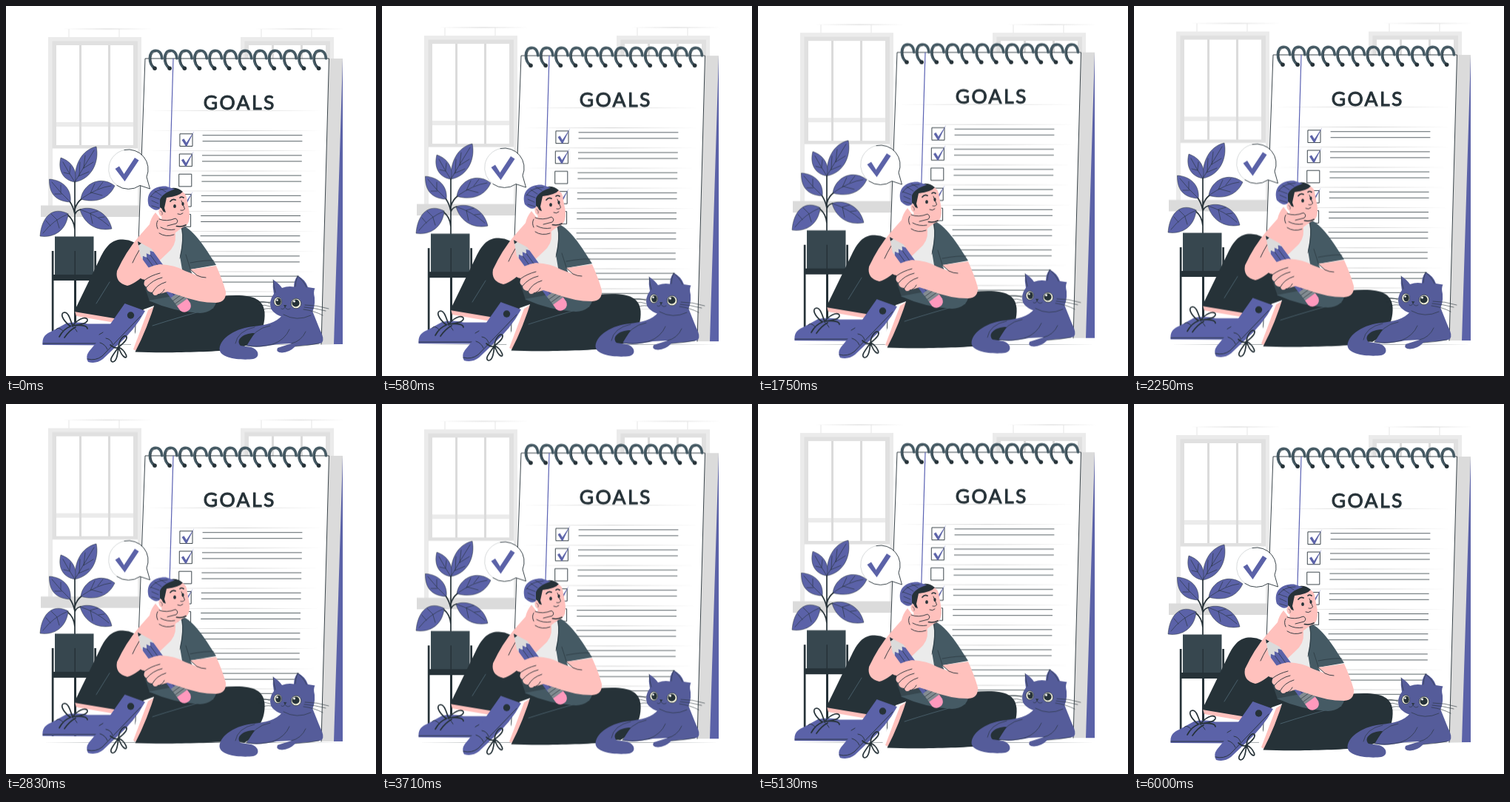
An HTML page for the animation above (6040 ms loop, 500 px wide and 500 px high).

```html
<!DOCTYPE html>
<html lang="en">
<head>
<meta charset="utf-8">
<title>Goals</title>
<style>
  html, body { margin: 0; width: 100%; height: 100%; overflow: hidden; background: #fff; }
  svg { display: block; width: 100%; height: 100%; }

  /* Six seconds of motion, then one short rest before the loop repeats. */
  .slow { animation: slow 6.04s linear infinite; }
  .fast { animation: fast 6.04s linear infinite; }
  @keyframes slow {
    0%, 99.34%, 100% { transform: translateY(0); }
    49.67% { transform: translateY(-10px); }
  }
  @keyframes fast {
    0%, 49.67%, 99.34%, 100% { transform: translateY(0); }
    24.83%, 74.5% { transform: translateY(-10px); }
  }

  .purple { fill: #5b62a8; }
  .cat { fill: #555c9a; }
  .dark { fill: #263238; }
  .slate { fill: #37474f; }
  .jacket { fill: #455a64; }
  .skin { fill: #ffc1bd; }
  .pale { fill: #ebebeb; }
  .grey { fill: #dbdbdb; }
  .white { fill: #fff; }
  .rule { fill: #d4d4d4; }
  .ink { fill: none; stroke: #263238; stroke-width: .9; stroke-linecap: round; stroke-linejoin: round; }
  .thin { stroke-width: .6; }
  .bold { stroke-width: 1.7; }
  .title {
    font: 400 26.5px Lato, "Open Sans", sans-serif; letter-spacing: 2.4px;
    fill: #263238; stroke: #263238; stroke-width: 1; stroke-linejoin: round;
  }
</style>
</head>
<body>
<svg viewBox="0 0 500 500" xmlns="http://www.w3.org/2000/svg">
  <defs>
    <g id="window">
      <path class="rule" d="M18 31L80 30.500L142 31L80 31.500ZM27.700 31H28.300V42H27.700ZM95.700 31H96.300V42H95.700Z"/>
      <path class="pale" d="M0 42H126V272H0Z"/>
      <path class="white" d="M6 192H121V272H6Z"/>
      <path fill="#e0e0e0" d="M5.500 47.500H121V192.500H5.500Z"/>
      <path class="white" d="M11 53H115V188H11Z"/>
      <path class="pale" d="M11 157H115V163H11Z"/>
      <path class="grey" d="M42 53H45V188H42ZM81 53H84V188H81Z"/>
    </g>
    <path id="tick" class="purple" d="M237.500 181L240.500 179.300L243.800 184.800L254.300 169L244.300 189.500L243 189.500Z"/>
    <g id="coil" fill="none" stroke-linecap="round">
      <path stroke="#455a64" stroke-width="3.600" d="M0 0C-9 -6 -9 -24 1 -24C7 -24 9.300 -19 9.800 -13.500"/>
      <path stroke="#263238" stroke-width=".7" d="M-1.500 -2.500C-7.500 -9 -6 -22.300 1.500 -22.500"/>
      <circle class="dark" r="2.800"/>
    </g>
  </defs>

  <path class="dark" opacity=".7" d="M50 457.200L250 456.700L455 457.200L250 457.700Z"/>

  <g class="slow">
    <use href="#window" x="57"/>
    <use href="#window" x="317"/>
    <path class="grey" d="M47 269.500H190V285H47Z"/>
  </g>

  <g class="fast">
    <path class="purple" d="M454 71H455V457H441Z"/>
    <path class="grey" d="M436 71H455L443 457H425Z"/>
    <path class="white" d="M188 71H436.500L426 457H174Z"/>
    <g id="rules"></g>
    <path class="ink" d="M174 457L188 71H436.500L426 457"/>
    <path fill="none" stroke="#5b62b4" stroke-width="1.200" d="M226 71L220.500 260"/>
    <text class="title" x="266.700" y="140.300">GOALS</text>
    <g id="rows"></g>
    <g id="coils"></g>
  </g>

  <g class="slow">
    <path class="white" d="M190 231L194.500 247L181 242.500A26.700 26.700 0 1 1 190 231Z"/>
    <path class="ink" d="M150 242.500A26.700 26.700 0 0 0 181 242.500L194.500 247L190 231A26.700 26.700 0 0 0 160 194.500"/>
    <path class="ink thin" opacity=".3" d="M150 242.500A26.700 26.700 0 0 1 160 194.500"/>
    <path class="purple" d="M147.500 220L153 216.500L159.500 227L174 205L179.500 208.500L160.500 237Z"/>
  </g>

  <g class="fast">
    <path class="ink bold" d="M93 312V237M93 281Q91 271 86 264M93 275Q95 266 103 260M93 282Q95 276 101 275M93 302Q92 289 83 282"/>
    <g class="purple" stroke="#263238" stroke-width=".5">
      <path d="M93 238C92 216 101 195 122 190C126 208 118 233 93 238Z"/>
      <path d="M93 238C76 235 70 221 74 205C89 210 97 223 93 238Z"/>
      <path d="M87 265C66 264 58 252 58.500 234C76 235 89 247 87 265Z"/>
      <path d="M101 261C104 240 128 228 147 243C138 263 118 266 101 261Z"/>
      <path d="M100 275C112 270 137 275 143 301C124 305 106 296 100 275Z"/>
      <path d="M84 281C64 270 48 284 46 311C66 314 82 302 84 281Z"/>
    </g>
    <path class="ink thin" d="M93 238Q106 216 119 195M99 229L100 211M98 230L112 224M105 219L107 202M105 219L118 211M93 238Q84 224 77 211M86 227L78 225M86 226L87 216M87 265Q73 252 62 238M75 254L66 254M74 252L74 242M101 261Q124 245 142 243M114 253L120 240M115 252L130 256M124 247L131 238M100 275Q122 282 139 297M114 280L124 277M114 280L117 294M125 286L133 285M84 281Q64 289 50 307M69 289L61 281M69 290L72 300M60 297L54 290"/>
    <path class="slate" d="M66 311.500H118.500V364H66Z"/>
    <path class="dark" d="M61.800 331H64.500V450H61.800ZM119.300 331H122V450H119.300ZM61.800 363H122V371H61.800ZM92 371H95V450H92ZM92.500 331H94V364H92.500Z"/>
  </g>

  <g class="slow">
    <!-- far leg and shoe -->
    <path class="white" d="M96 414L155 422L146 436L96 434Z"/>
    <path class="skin" d="M93 412L157 421L153 429L95 419Z"/>
    <path class="purple" d="M49.500 458C48.500 447 54 443 61 440L81 429Q96 426 110 429.500L150 429.500L136 458.500Z"/>
    <path class="ink" d="M50 456H136M126 444L131 441M78 440Q70 432 68 437M96 440Q92 432 84 431"/>
    <path class="dark" d="M92 413L127 341C136 322 145 315 158 315.500Q174 316 186 330L212 400L158 424Z"/>
    <path class="ink bold" d="M72 447Q78 436 87 433M79 448Q86 438 94 434M87 433C75 423 73 415 79 414C85 414 87 425 90 432C101 419 111 420 110 425C109 429 99 431 90 432M90 432C104 430 110 433 110 436"/>

    <!-- near leg and shoe -->
    <path class="white" d="M186 410L200 405L176 467L168 460Z"/>
    <path class="skin" d="M192 411L206 402L178 467L172 464Z"/>
    <path class="dark" d="M203 396Q191 436 174.500 467.500C210 469 270 468 302 465C336 461 351 440 349.500 414C348 397 335 391 311 391C283 391 260 397 240 402L195 385L190 400Z"/>
    <path class="purple" d="M160.500 402L188 412Q174 438 150 459L131 477Q122 484 111 481Q107 474 112 467L131 444Z"/>
    <circle class="dark" cx="168.500" cy="418" r="4.700"/>
    <path class="ink" d="M110 477Q121 480 130 473L182 419M135 449Q142 450 144 457M127 455Q134 457 137 464"/>
    <path class="ink bold" d="M141 458Q148 464 152 461C145 471 138 479 144 481C150 481 151 469 152 461C158 478 165 477 162 471Q159 464 152 461C153 449 161 443 163 447C164 452 157 457 152 461"/>
    <path class="ink thin" style="stroke:#607d8b" d="M198 432Q235 420 280 408M122 402L140 373"/>

    <!-- torso -->
    <path class="slate" d="M192 352L186 375L194 399L260 410L245 340Z"/>
    <path class="jacket" d="M237 296C254 302 268 325 284 350L249 356L262 385L285 397Q282 414 262 415Q226 413 193 398L236 390L230 338Z"/>
    <path class="pale" d="M207 320L237 301Q240 315 235 338L238 356L196 363L190 344Z"/>
    <path class="ink thin" d="M238 300Q241 320 235 341M249 347Q270 343 281 344M249 355L243 336"/>

    <!-- head -->
    <path class="skin" d="M211 258L236 250Q244 252 245 264L247.500 277Q250 296 239 299L228 307L210 298Z"/>
    <path class="dark" d="M209 252Q227 240 239 251Q234 257 217 259L214 273L216 279Q209 278 207 268Z"/>
    <path class="purple" d="M193 270C188 253 199 243 216 243.500L228 247.500Q211 253 208 262L208 274Q202 279 193 270Z"/>
    <path class="ink thin" d="M195 258Q202 247 218 247M197 263L206 267M196 257L207 261M201 250L210 256M207 246L216 251M197 270L207 273"/>
    <path class="skin" d="M210 273Q205 273 207 281Q210 287 215 283Z"/>
    <path class="ink thin" d="M209 277Q212 278 211 282"/>
    <ellipse class="dark" cx="228" cy="270.500" rx="1.900" ry="2.600"/>
    <ellipse class="dark" cx="239" cy="267.500" rx="1.600" ry="2.400"/>
    <path class="ink bold" d="M222 264Q225 260 229 262M235 259Q237 257 240 259"/>
    <path class="ink" d="M237 263L241.500 274Q240 277 236 276M232 281Q236 283 239 280"/>
    <path class="ink bold" d="M226 296Q235 300 243 296"/>

    <!-- raised arm -->
    <path class="skin" d="M202 279Q196 286 194 295L179 312Q162 332 150 358Q147 374 164 378Q177 375 199 352L218 334Q230 324 229 310L228 299Q234 294 232 289Q228 285 219 289L209 288Z"/>
    <path class="ink" d="M207 288Q217 292 229 287Q234 290 230 294L218 297M209 299Q218 304 228 302M207 307Q216 313 227 309M205 290Q202 295 205 301M180 330Q174 340 171 347"/>

    <!-- pencil -->
    <g transform="translate(178 318) rotate(54)">
      <path class="grey" d="M0 0L19 -9H26V9H19Z"/>
      <path class="dark" d="M0 0L5 -2.400V2.400Z"/>
      <path class="purple" d="M24 -9L20 -6L25 -3L20 0L25 3L20 6L24 9H91V-9Z"/>
      <path class="ink thin" d="M25 -3H91M25 3H91"/>
      <path fill="#828b91" d="M88 -8.500H102V8.500H88Z"/>
      <path fill="#ff99bd" d="M102 -8.500H109Q116 -7 116 0Q116 7 109 8.500H102Z"/>
      <path class="ink thin" d="M93 -8.500V8.500M98 -8.500V8.500"/>
    </g>

    <!-- lower arm and hand -->
    <path class="skin" d="M249 356L284 351Q293 371 297 386Q298 400 284 401Q260 401 234 391L218 386L205 390Q199 393 198 387Q190 387 190 380Q184 377 188 370Q179 369 181 363Q191 351 208 349Q229 350 242 358L258 364Z"/>
    <path class="ink" d="M188 370Q196 364 208 361M190 380Q198 370 211 367M198 387Q203 377 216 373M205 390Q211 389 214 383M249 356L258 364Q264 367 270 367"/>
  </g>

  <g class="fast">
    <path class="dark" d="M307 456Q309 437 337 434L342 446L322 459Z"/>
    <path class="cat" d="M374 417C365 429 350 431 335 433C311 435 290 448 288.500 463C288 477 320 479 334 477C344 475 342 464 331 461L317 459C310 452 319 442 336 442L325 459C340 463 354 459 366 457L386 456L367 462Q364 468 373 468.500Q383 468 391 460C405 458 420 458 427 455Q431 450 424 437L414 412Z"/>
    <path class="ink thin" d="M325 459Q334 436 357 432M325 459Q343 462 361 457M361 457Q377 451 383 437M386 456Q399 453 405 440M391 460Q407 459 423 456M310 456Q313 439 336 434"/>
    <path class="cat" d="M361 370Q368 374 373 381Q381 378 389 379.500Q389 371 394 364.500Q404 369 408 380L417.500 381.500Q415 386 417 394Q418 408 412 417Q405 425 389 423Q365 421 358 409Q355 398 362 389Q360 380 361 370Z"/>
    <path class="ink thin" d="M361 370Q362 380 364 387M394 365Q391 373 391 379M394 365Q402 371 406 380M375 417Q393 427 412 418"/>
    <g fill="#f5f3df" stroke="#263238" stroke-width=".7">
      <ellipse cx="367.300" cy="399.500" rx="5.300" ry="6"/>
      <circle cx="392" cy="402" r="6.800"/>
    </g>
    <ellipse class="dark" cx="368" cy="399.500" rx="3.800" ry="4.800"/>
    <circle class="dark" cx="391.500" cy="401.500" r="5.100"/>
    <circle class="white" cx="366.500" cy="397.500" r="1.200"/>
    <circle class="white" cx="389.500" cy="399" r="1.500"/>
    <path class="dark" d="M375 404L379.500 404.500L377 407Z"/>
    <path class="ink thin" d="M377 407Q375 411 372 409M377 407Q380 412 384 409M404 404Q420 404 436 409M403 407Q417 408 432 412M402 410Q417 412 428 418M357 402Q348 398 339 400M357 406Q350 403 342 405M358 409Q350 408 346 411"/>
  </g>
</svg>
<script>
  const add = (id, html) => document.getElementById(id).innerHTML = html;
  const repeat = (count, draw) => Array.from({ length: count }, (_, i) => draw(i)).join('');
  const pitch = 27.2;
  const checked = [0, 1, 3];

  // Rules taper to a point at both ends.
  add('rules', repeat(12, i => {
    const y = 141.3 + pitch * i, shift = .8 * i;
    return `<path class="rule" d="M${191 - shift} ${y}L310 ${y - .5}L${428 - shift} ${y}L310 ${y + .5}Z"/>`;
  }));

  add('rows', repeat(9, i => {
    const y = pitch * i, x = -.6 * i;
    const box = i < 5 ? '<path class="ink" d="M235.300 172.800H252V189.500H235.300Z"/>' : '';
    const tick = checked.includes(i) ? '<use href="#tick"/>' : '';
    return `<g transform="translate(${x} ${y})">${box}${tick}
      <path class="ink" opacity=".85" d="M266 174.700H400M266 182.700H400"/></g>`;
  }));

  add('coils', repeat(12, i => `<use href="#coil" x="${201 + 20.15 * i}" y="84.300"/>`));
</script>
</body>
</html>
```
